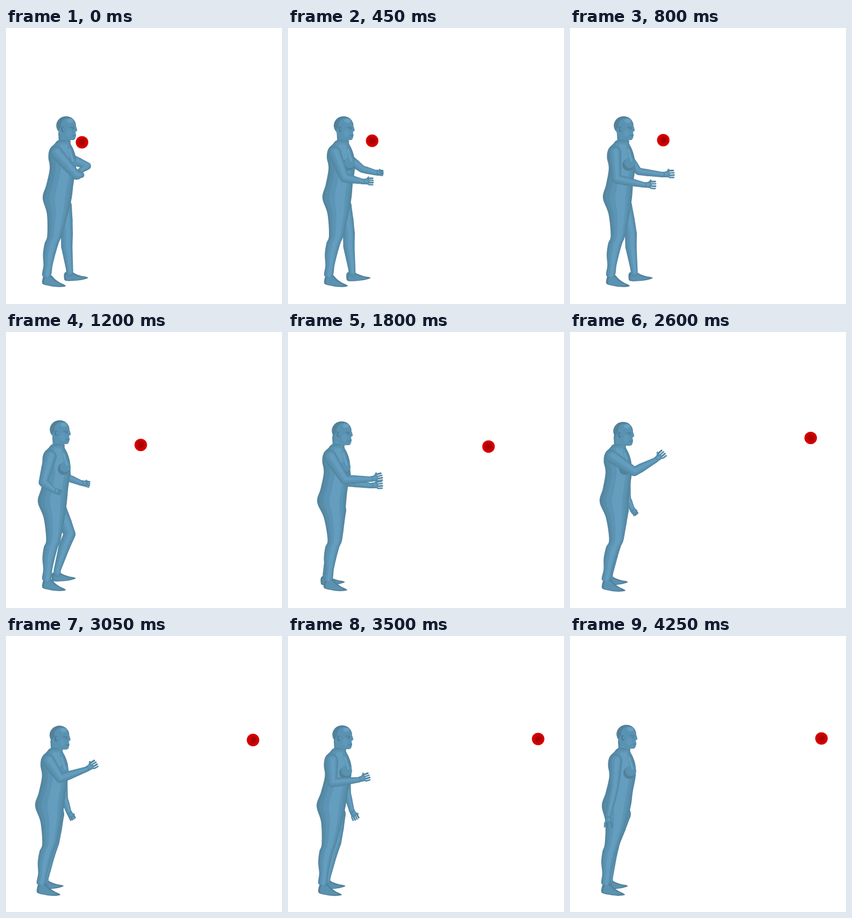
An HTML page with a canvas for the animation above (4.3 s loop, 512 px wide and 512 px high).

```html
<!DOCTYPE html>
<html lang="en">
<head>
<meta charset="utf-8">
<title>Figure and ball</title>
<style>
  html, body { margin: 0; width: 100%; height: 100%; overflow: hidden; background: #fff; }
  canvas { display: block; width: 512px; height: 512px; }
</style>
</head>
<body>
<canvas id="stage" width="512" height="512"></canvas>
<script>
const ctx = document.getElementById('stage').getContext('2d');
const LOOP = 4300, STEP = 50;
const DARK = '#487690', SHADE = '#528199', BASE = '#5a92b2', LIGHT = '#67a1c1';
// Layers from the full width inwards; the inner ones lean to the light.
const LAYERS = [[1, '#54869f'], [.85, '#578da9'], [.65, '#5b94b4'], [.35, '#649dbe']];

// Key poses. spine: x of chest, hip, near knee and near ankle; head: offset;
// near, far: elbow and wrist of each arm; step: x of far knee and far heel.
const POSES = [
  { t: 0, spine: [104, 95, 90, 76], head: [12, 0], near: [130, 273, 138, 273], far: [151, 256, 139, 264], step: [113, 109], ball: [141, 212] },
  { t: 800, spine: [94, 88, 89, 76], head: [0, 0], near: [86, 280, 137, 291], far: [127, 266, 171, 272], step: [113, 110], ball: [173, 208] },
  { t: 1200, spine: [93, 86, 88, 76], head: [0, 0], near: [69, 279, 88, 293], far: [114, 270, 139, 280], step: [118, 86], ball: [250, 209.5] },
  { t: 1800, spine: [89, 81, 87, 75], head: [0, 2], near: [105, 274, 153, 273], far: [112, 280, 153, 285], step: [88, 62], ball: [372, 212.5] },
  { t: 2600, spine: [88, 82, 86, 68], head: [-1, 3], near: [119, 259, 158, 238], far: [106, 308, 115, 328], step: [88, 64], ball: [446.5, 196.5] },
  { t: 3500, spine: [92, 80, 76, 65], head: [1, 2], near: [82, 272, 130, 267], far: [110, 292, 118, 323], step: [88, 63], ball: [464, 191] },
  { t: 4250, spine: [96, 86, 78, 67], head: [5, 1], near: [82, 280, 71, 333], far: [96, 285, 93, 315], step: [82, 64], ball: [466.5, 190] }
];
const SPINE_Y = [240, 315, 385, 455];
// Side view of torso and near leg: height, offset from the spine, half width.
const PROFILE = [[208, 4, 10], [215, 1, 15], [225, -1, 22], [240, 0, 25.5], [260, 4, 24.5], [290, 2, 25],
  [315, 0, 27], [345, 2.5, 19.5], [385, 0, 13.5], [400, -2.5, 13], [420, -3, 11.5], [440, -1, 8.5], [460, 0, 7.5]];
const FACE = [[86, 190], [106, 172], [117, 181], [120, 190], [117, 193], [118, 199], [115, 207], [107, 208], [97, 207]];
const FOOT = [[2, -14], [-1, -4], [1, 4], [15, 6], [30, 6], [43, 3], [40, 0], [31, -3], [22, -8], [13, -15]];

// Monotone cubic interpolation of one part of the pose.
function sample(part, t) {
  const last = POSES.length - 1;
  let i = 0;
  while (i < last - 1 && t >= POSES[i + 1].t) i++;
  const h = POSES[i + 1].t - POSES[i].t, u = (t - POSES[i].t) / h;
  const slope = (k, c) => (POSES[k + 1][part][c] - POSES[k][part][c]) / (POSES[k + 1].t - POSES[k].t);
  const tangent = (k, c) => {
    const a = slope(Math.max(k - 1, 0), c), b = slope(Math.min(k, last - 1), c);
    return a * b <= 0 ? 0 : 2 * a * b / (a + b);
  };
  return POSES[i][part].map((p, c) => p + (POSES[i + 1][part][c] - p) * u * u * (3 - 2 * u)
    + h * u * (1 - u) * ((1 - u) * tangent(i, c) - u * tangent(i + 1, c)));
}

// Smooth closed outline through the points.
function blob(points, color) {
  const n = points.length, at = i => points[(i + n) % n];
  ctx.beginPath();
  ctx.moveTo(...points[0]);
  for (let i = 0; i < n; i++) {
    const [a, b, c, d] = [at(i - 1), at(i), at(i + 1), at(i + 2)];
    ctx.bezierCurveTo(b[0] + (c[0] - a[0]) / 6, b[1] + (c[1] - a[1]) / 6,
      c[0] - (d[0] - b[0]) / 6, c[1] - (d[1] - b[1]) / 6, c[0], c[1]);
  }
  ctx.fillStyle = color;
  ctx.fill();
}

function oval(x, y, rx, ry, color) {
  ctx.beginPath();
  ctx.ellipse(x, y, rx, ry, 0, 0, 2 * Math.PI);
  ctx.fillStyle = color;
  ctx.fill();
}

function line(points, width, color) {
  ctx.beginPath();
  points.forEach(p => ctx.lineTo(...p));
  ctx.lineWidth = width;
  ctx.strokeStyle = color;
  ctx.stroke();
}

// Tapered limb through joints [x, y, radius].
function tube(joints) {
  for (const [k, color] of LAYERS) {
    const inner = joints.map(([x, y, r]) => [x + (1 - k) * r * .3, y - (1 - k) * r * .3, r * k]);
    inner.forEach(([x, y, r], i) => {
      oval(x, y, r, r, color);
      if (!i) return;
      const [px, py, pr] = inner[i - 1];
      const len = Math.hypot(x - px, y - py) || 1;
      const nx = (py - y) / len, ny = (x - px) / len;
      ctx.beginPath();
      ctx.moveTo(px + nx * pr, py + ny * pr);
      ctx.lineTo(x + nx * r, y + ny * r);
      ctx.lineTo(x - nx * r, y - ny * r);
      ctx.lineTo(px - nx * pr, py - ny * pr);
      ctx.fill();
    });
  }
}

// The hand carries on from the forearm, bent slightly upwards.
function hand(x, y, dir, len) {
  const polar = (a, d) => [x + Math.cos(dir + a) * d, y + Math.sin(dir + a) * d];
  for (let i = 0; i < 4; i++) {
    const a = (i - 1.5) * .2;
    line([polar(a, len * .4), polar(a * 1.4, len * .7), polar(a, len)], 3, i % 2 ? BASE : SHADE);
  }
  line([polar(0, len * .25), polar(-.6, len * .7)], 3, BASE);
  tube([[x, y, 5], [...polar(0, len * .4), 5.5]]);
}

function arm(sx, sy, [ex, ey, wx, wy], size) {
  const dir = Math.atan2(wy - ey, wx - ex), len = Math.hypot(wx - ex, wy - ey);
  hand(wx, wy, dir - .2, Math.min(22, len * .6));
  tube([[sx, sy, 12 * size], [(sx + ex) / 2, (sy + ey) / 2, 10.5 * size], [ex, ey, 8.5 * size],
    [ex + (wx - ex) * .35, ey + (wy - ey) * .35, 8 * size], [wx, wy, 5]]);
}

function foot(x, y, turn, height) {
  const place = k => FOOT.map(([px, py]) => {
    const fx = 14 + (px - 14) * k, fy = py * k;
    return [x + fx * Math.cos(turn) - fy * Math.sin(turn),
      y + (fx * Math.sin(turn) + fy * Math.cos(turn)) * height];
  });
  blob(place(1), SHADE);
  blob(place(.75), BASE);
}

function farLeg(hip, [kx, heel]) {
  // The foot lifts halfway through the step back.
  const lift = 7 * Math.max(0, Math.sin(Math.PI * (110 - heel) / 46));
  const ky = 382 - lift, ax = heel + 9, ay = 449 - lift;
  foot(heel, 466 - lift, -.12, .85);
  tube([[hip + 12, 330, 15], [(hip + 12 + kx) / 2 + 1, (330 + ky) / 2, 12.5], [kx, ky, 11],
    [kx + (ax - kx) * .35 - 2, ky + (ay - ky) * .35, 10.5], [ax, ay, 6.5], [ax, ay + 6, 6.5]]);
}

function spineAt(y, xs) {
  const i = y < SPINE_Y[1] ? 0 : y < SPINE_Y[2] ? 1 : 2;
  const u = Math.max(0, (y - SPINE_Y[i]) / (SPINE_Y[i + 1] - SPINE_Y[i]));
  return xs[i] + (xs[i + 1] - xs[i]) * u;
}

function body(spine) {
  const [chest] = spine;
  tube([[chest + 3, 195, 10], [chest + 4, 213, 10]]);
  for (const [k, color] of LAYERS) {
    const edge = side => PROFILE.map(([y, offset, half], i) =>
      [spineAt(y, spine) + offset + half * (side * k + (1 - k) * .3), i ? y : y + (1 - k) * 12]);
    blob([...edge(1), ...edge(-1).reverse()], color);
  }
  oval(chest + 14, 254, 11, 11, SHADE);
  oval(chest + 17, 250, 10, 10, BASE);
  line([[chest + 14, 226], [chest + 20, 246]], 4, LIGHT);
}

function head([dx, dy]) {
  ctx.save();
  ctx.translate(dx, dy);
  oval(99.5, 181, 18.3, 17.3, SHADE);
  blob(FACE, BASE);
  oval(103, 180, 13, 13, BASE);
  oval(107, 172, 6, 4, LIGHT);
  oval(105, 195, 5, 7, '#5f99b9');
  line([[107, 184], [114, 184]], 2, SHADE);
  line([[111, 187], [114, 187]], 1.5, DARK);
  line([[112, 200], [117, 199.5]], 1.2, DARK);
  oval(93.5, 188, 3, 5, DARK);
  oval(94.5, 187.5, 2, 3.5, BASE);
  ctx.restore();
}

function ball([x, y]) {
  const tone = ctx.createRadialGradient(x + 1, y, 1, x, y, 11.6);
  [[0, '#a60000'], [.4, '#b40000'], [.6, '#cc0000'], [1, '#dc0000']].forEach(s => tone.addColorStop(...s));
  oval(x, y, 11.6, 11.6, tone);
}

function draw(t) {
  ctx.clearRect(0, 0, 512, 512);
  ctx.lineCap = ctx.lineJoin = 'round';
  const spine = sample('spine', t);
  const [chest, hip, , ankle] = spine;
  arm(chest + 14, 242, sample('far', t), .8);
  farLeg(hip, sample('step', t));
  foot(ankle - 8, 471 + (76 - ankle) * .15, .12, 1);
  body(spine);
  head(sample('head', t));
  arm(chest - 11, 231, sample('near', t), 1);
  ball(sample('ball', t));
}

const start = performance.now();
function tick() {
  const t = (performance.now() - start) % LOOP;
  draw(Math.floor(t / STEP) * STEP);
  requestAnimationFrame(tick);
}
tick();
</script>
</body>
</html>
```
